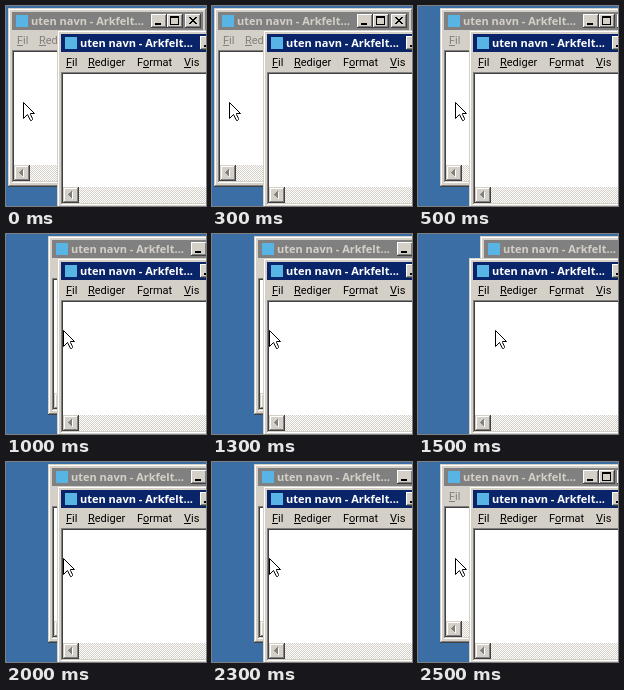
Animation, 200 px wide and 200 px high, one loop 3 s. Source, as an HTML page with a canvas:

```html
<!DOCTYPE html>
<html lang="nb">
<head>
<meta charset="utf-8">
<title>Vinduer</title>
<style>
  html, body { margin: 0; width: 100%; height: 100%; overflow: hidden; background: #3a6ea5; }
  canvas { display: block; }
</style>
</head>
<body>
<canvas id="stage" width="200" height="200"></canvas>
<script>
const ctx = document.getElementById('stage').getContext('2d');
const FACE = '#d4d0c8', WHITE = '#fff', SHADOW = '#808080', DARK = '#404040';
const WIDTH = 199, HEIGHT = 179, STEP = 500;
const OFFSETS = [0, 20, 40, 60, 40, 20];
// Label, left edge, index of the underlined letter
const MENU = [['Fil', 9, 0], ['Rediger', 31, 0], ['Format', 80, 1], ['Vis', 127, 0]];
const ARROW = new Path2D('M.5 .5V16.5L4.5 12.5L7.5 18.5H8.5L9.5 17.5V16.5L7.5 12.5V11.5H11.5Z');

function rect(color, x, y, w, h) {
  ctx.fillStyle = color;
  ctx.fillRect(x, y, w, h);
}

function text(str, font, color, x, y) {
  ctx.font = font;
  ctx.fillStyle = color;
  ctx.fillText(str, x, y);
}

// Two-pixel edge: outer and inner light/dark pairs around a filled centre
function bevel(x, y, w, h, [light, dark, innerLight, innerDark], fill = FACE) {
  rect(dark, x, y, w, h);
  rect(light, x, y, w - 1, h - 1);
  rect(innerDark, x + 1, y + 1, w - 2, h - 2);
  rect(innerLight, x + 1, y + 1, w - 3, h - 3);
  rect(fill, x + 2, y + 2, w - 4, h - 4);
}
const RAISED = [FACE, DARK, WHITE, SHADOW];
const BUTTON = [WHITE, DARK, FACE, SHADOW];
const SUNKEN = [SHADOW, WHITE, DARK, FACE];

function captionButtons() {
  for (const x of [143, 159, 177]) bevel(x, 6, 16, 14, BUTTON);
  rect('#000', 147, 15, 6, 2);
  rect('#000', 162, 8, 9, 9);
  rect(FACE, 163, 10, 7, 6);
  for (let i = 0; i < 7; i++) {
    rect('#000', 181 + i, 9 + i, 2, 1);
    rect('#000', 187 - i, 9 + i, 2, 1);
  }
}

function scrollArrow(color, x, y) {
  for (let i = 0; i < 4; i++) rect(color, x + i, y - i, 1, 2 * i + 1);
}

function scrollBar(y) {
  const right = WIDTH - 6;
  rect(WHITE, 6, y, right - 6, 16);
  for (let row = 0; row < 16; row++)
    for (let x = 23 - row % 2; x < right; x += 2) rect(FACE, x, y + row, 1, 1);
  bevel(6, y, 16, 16, RAISED);
  scrollArrow(WHITE, 12, y + 8);
  scrollArrow(SHADOW, 11, y + 7);
}

function drawWindow(left, top, active) {
  ctx.save();
  ctx.translate(left, top);
  bevel(0, 0, WIDTH, HEIGHT, RAISED);
  rect(active ? '#0a246a' : SHADOW, 4, 4, WIDTH - 8, 18);
  rect('#58b4e4', 8, 7, 12, 12);
  text('uten navn - Arkfelt...', 'bold 11px "Noto Sans", sans-serif', active ? WHITE : FACE, 23, 17);
  captionButtons();

  const ink = active ? '#000' : SHADOW;
  for (const [label, x, key] of MENU) {
    text(label, '11px Roboto, sans-serif', ink, x, 36);
    const before = ctx.measureText(label.slice(0, key)).width;
    rect(ink, Math.round(x + before), 37, Math.round(ctx.measureText(label[key]).width), 1);
  }

  bevel(4, 42, WIDTH - 8, HEIGHT - 46, SUNKEN, WHITE);
  scrollBar(HEIGHT - 22);
  ctx.restore();
}

function drawCursor(x, y) {
  ctx.save();
  ctx.translate(x, y);
  ctx.fillStyle = WHITE;
  ctx.strokeStyle = '#000';
  ctx.lineJoin = 'round';
  ctx.fill(ARROW);
  ctx.stroke(ARROW);
  ctx.restore();
}

// The rear window is dragged behind the front one in hard steps
function frame() {
  const shift = OFFSETS[Math.floor(performance.now() / STEP) % OFFSETS.length];
  rect('#3a6ea5', 0, 0, 200, 200);
  drawWindow(2 + shift, 2, false);
  drawWindow(51, 24, true);
  drawCursor(17 + shift, 96);
  requestAnimationFrame(frame);
}
frame();
</script>
</body>
</html>
```
